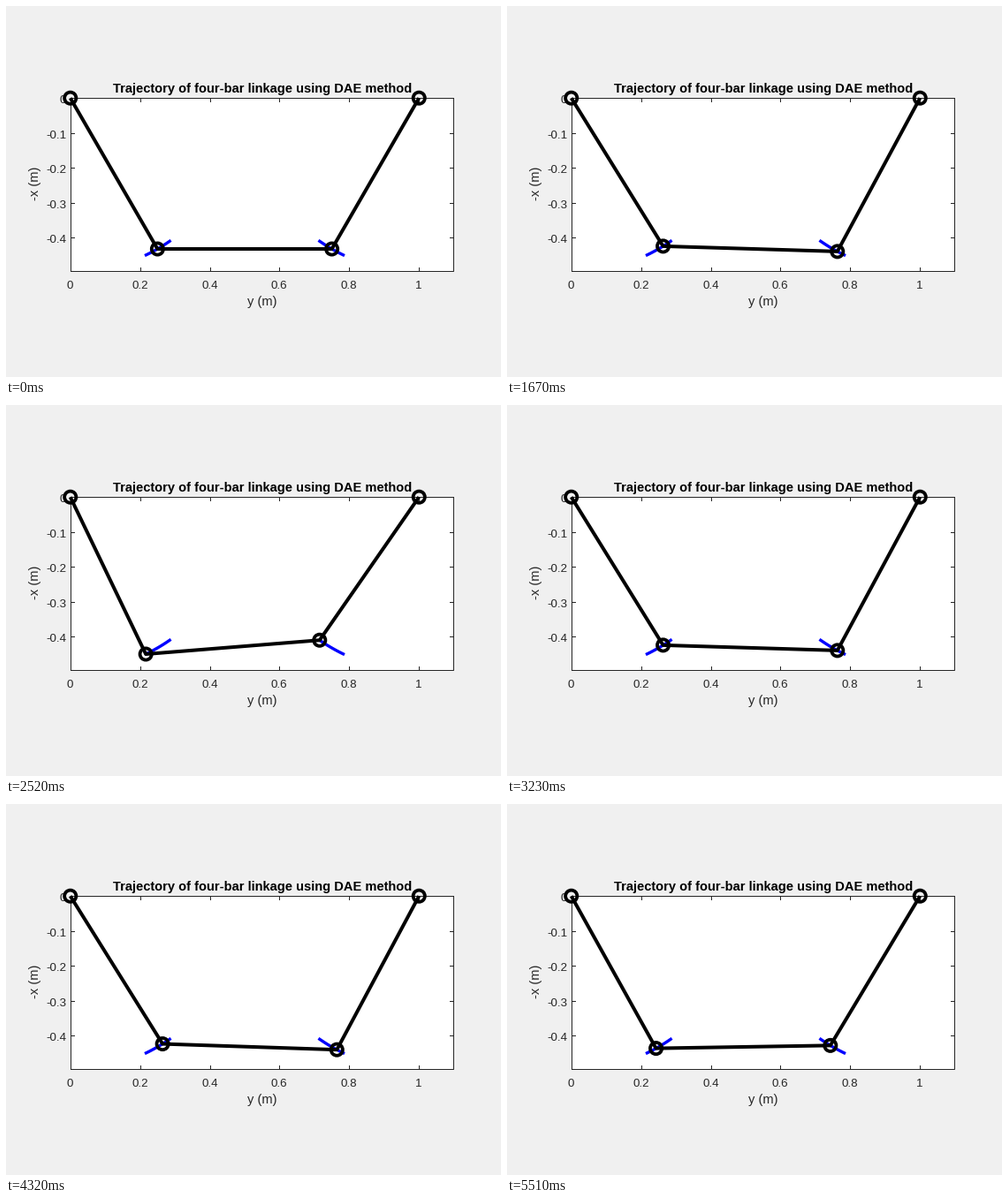
Animation, 560 px wide and 420 px high, one loop 5.58 s. Source, as a matplotlib script:

```python
import numpy as np
import matplotlib.pyplot as plt
from matplotlib.animation import FuncAnimation
from matplotlib.patches import Circle, Rectangle

WIDTH, HEIGHT, DPI = 560, 420, 100
LOOP_MS, STEP_MS = 5580, 10
SCALE, ORIGIN = 394.5, np.array([72.75, 104.2])
LEFT, RIGHT, TOP, BOTTOM = 73, 506, 104, 300
INK = "#262626"
BAR = 0.5
TILT_MAX = 0.0875

plt.rcParams["font.family"] = "Liberation Sans"


def pt(px):
    return px * 72 / DPI


def to_px(points):
    return ORIGIN + SCALE * np.asarray(points) * [1, -1]


def joints(tilt):
    """Four joints of the linkage for a given tilt of the coupler bar."""
    coupler = BAR * np.array([np.cos(tilt), -np.sin(tilt)])
    reach = np.array([1.0, 0.0]) - coupler
    length = np.hypot(*reach)
    down = np.array([reach[1], -reach[0]]) / length
    left = reach / 2 + down * np.sqrt(BAR**2 - length**2 / 4)
    return to_px([(0, 0), left, left + coupler, (1, 0)])


# Pose changes: single early steps, then runs of (first ms, last ms, count).
RUNS = [(1670, 2150, 8), (2250, 2730, 8), (2820, 3370, 9), (3440, 3990, 9),
        (4060, 4560, 9), (4630, 5170, 9), (5240, 5510, 5)]
times = np.concatenate([[0, 600]] + [np.linspace(*run) for run in RUNS])
times = np.round(times / 10) * 10

# Swing phase in radians at a few pose numbers; steps between are even.
phases = np.interp(np.arange(len(times)),
                   [0, 1, 2, 14, 24, 33, 47, 58],
                   [0, 0.04, 0.354, 5.13, 9.07, 12.65, 17.98, 22.18])
poses = [joints(TILT_MAX * np.sin(p)) for p in phases]

fig = plt.figure(figsize=(WIDTH / DPI, HEIGHT / DPI), dpi=DPI,
                 facecolor="#f0f0f0")
ax = fig.add_axes([0, 0, 1, 1])
ax.set_xlim(0, WIDTH)
ax.set_ylim(HEIGHT, 0)
ax.axis("off")


def line(xs, ys, width=1, color=INK, **kw):
    return ax.plot(xs, ys, color=color, lw=pt(width), **kw)[0]


def label(x, y, text, size=14.67, color=INK, ha="center", **kw):
    ax.text(x, y, text, fontsize=pt(size), color=color, ha=ha,
            va="baseline", **kw)


ax.add_patch(Rectangle((LEFT, TOP), RIGHT - LEFT, BOTTOM - TOP,
                       fc="white", ec=INK, lw=pt(1), zorder=1))

for value in ("0", "0.2", "0.4", "0.6", "0.8", "1"):
    x = to_px((float(value), 0))[0]
    line([x, x], [BOTTOM, BOTTOM - 4])
    line([x, x], [TOP, TOP + 4])
    label(x - 0.3, 320, value, 13.33)

for value in ("0", "-0.1", "-0.2", "-0.3", "-0.4"):
    y = to_px((0, float(value)))[1]
    line([LEFT, LEFT + 4], [y, y])
    line([RIGHT, RIGHT - 4], [y, y])
    label(68, y + 6, value, 13.33, ha="right", zorder=2)

label(290, 98, "Trajectory of four-bar linkage using DAE method",
      color="black", weight="bold")
label(290, 339, "y (m)")
label(37, 201, "-x (m)", rotation=90, rotation_mode="anchor")

trace = np.array([joints(t) for t in np.linspace(-TILT_MAX, TILT_MAX, 41)])
for k in (1, 2):
    line(*trace[:, k].T, width=3.4, color="blue", solid_capstyle="butt",
         zorder=4)

bars = line(*poses[0].T, width=4, color="black", solid_capstyle="butt",
            zorder=5)
# Patches, unlike line markers, keep their sub-pixel centres.
rings = [ax.add_patch(Circle(centre, 6.6, fill=False, ec="black", lw=pt(3.8),
                             snap=False, zorder=6)) for centre in poses[0]]


def update(frame):
    pose = poses[np.searchsorted(times, frame * STEP_MS, side="right") - 1]
    bars.set_data(*pose.T)
    for ring, centre in zip(rings, pose):
        ring.center = centre
    return [bars, *rings]


anim = FuncAnimation(fig, update, frames=LOOP_MS // STEP_MS,
                     interval=STEP_MS, repeat=True, repeat_delay=0)
plt.show()
```
